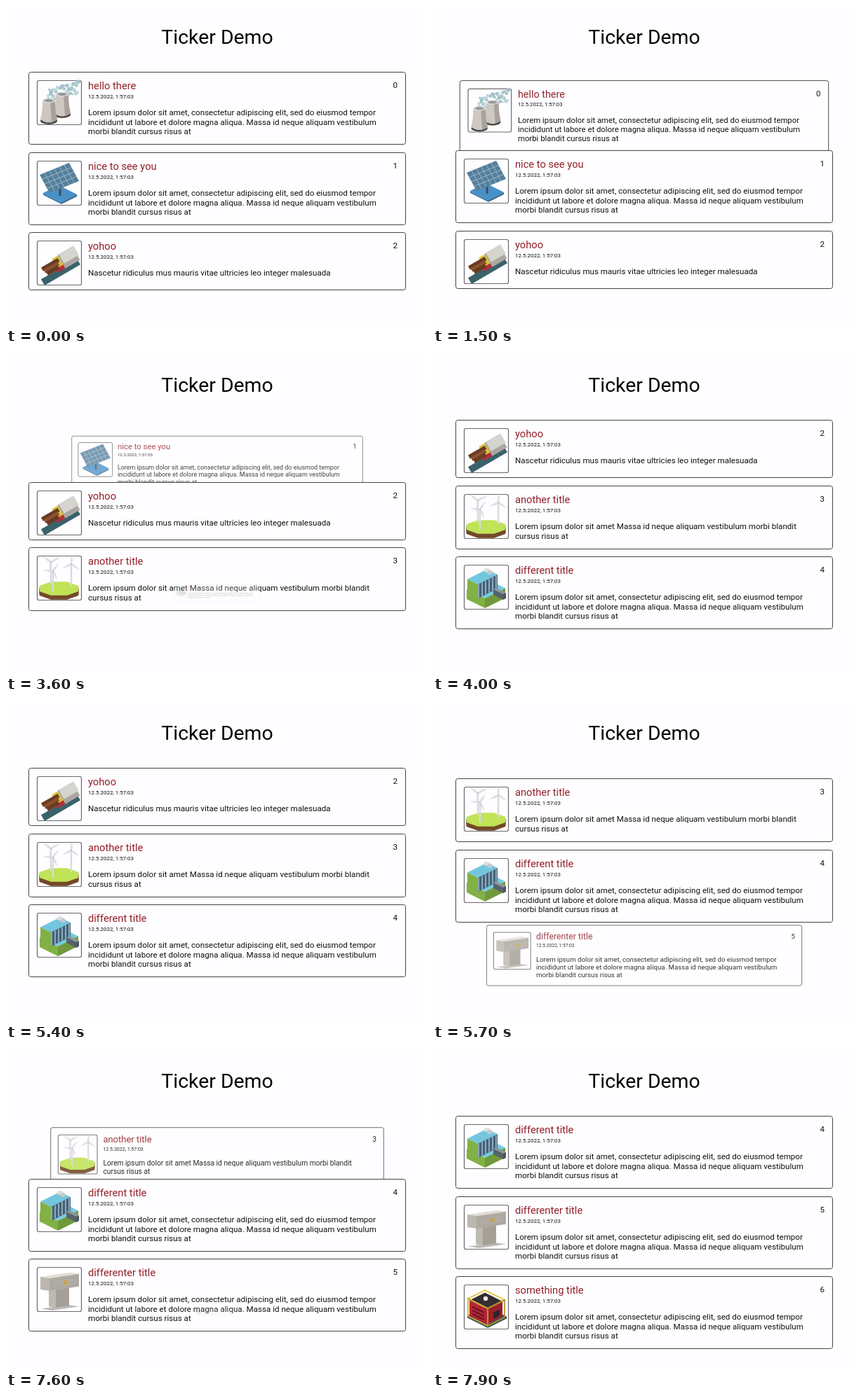
An HTML page for the animation above (8 s loop, 600x457 px).

```html
<!DOCTYPE html>
<html lang="en">
<head>
<meta charset="utf-8">
<title>Ticker Demo</title>
<style>
  html, body { margin: 0; width: 100%; height: 100%; overflow: hidden; background: #fefdff; }
  svg { display: block; }
  text { font-family: Roboto, sans-serif; font-size: 11.6px; fill: #111; }
  .heading { font-size: 28.4px; text-anchor: middle; fill: #000; }
  .title { font-size: 14.7px; fill: #922028; }
  .date { font-size: 7.93px; }
  .index { text-anchor: end; }
  .card { fill: #fefdff; stroke: #444; }
  .thumb { fill: #fefdff; stroke: #6a6a6a; stroke-width: 1.2; }
</style>
</head>
<body>
<svg id="stage" width="600" height="457" viewBox="0 0 600 457">
  <text class="heading" x="301" y="54">Ticker Demo</text>
</svg>
<script>
const LOOP = 8000, DURATION = 300, STARTS = [1490, 3550, 5540, 7567];
const LEFT = 32, TOP = 94.5, WIDTH = 538, GAP = 11.2, LINE = 13.4;

const long = [
  "Lorem ipsum dolor sit amet, consectetur adipiscing elit, sed do eiusmod tempor",
  "incididunt ut labore et dolore magna aliqua. Massa id neque aliquam vestibulum",
  "morbi blandit cursus risus at"];
const medium = [
  "Lorem ipsum dolor sit amet Massa id neque aliquam vestibulum morbi blandit",
  "cursus risus at"];
const short = ["Nascetur ridiculus mus mauris vitae ultricies leo integer malesuada"];

const repeat = (n, draw) => Array.from({ length: n }, (_, i) => draw(i)).join("");
const oval = (fill, x, y, rx, ry = rx) => `<ellipse fill="${fill}" cx="${x}" cy="${y}" rx="${rx}" ry="${ry}"/>`;
const line = (color, width, d) => `<path fill="none" stroke="${color}" stroke-width="${width}" d="${d}"/>`;
const face = (fill, shade, d) => `<path fill="${fill}" style="filter:brightness(${shade})" d="${d}"/>`;

// Isometric box: front bottom corner x,y; a runs right, b runs left, k is the slope.
function box(x, y, a, b, h, top, left = top, right = left, k = .5) {
  return face(top, 1, `M${x} ${y - h}l${a} ${-a * k}l${-b} ${-b * k}l${-a} ${a * k}z`) +
    face(left, .88, `M${x} ${y}v${-h}l${-b} ${-b * k}v${h}z`) +
    face(right, .76, `M${x} ${y}v${-h}l${a} ${-a * k}v${h}z`);
}

const tower = (x, y) =>
  oval("#4c4644", x, y + 29, 12, 5) +
  `<path fill="#cdc7c0" d="M${x - 9} ${y}q0 16-3 27q12 9 24 0q-3-11-3-27z"/>` +
  `<path fill="#a8a19b" d="M${x + 2} ${y}h7q0 16 3 27q-4 3-8 4z"/>` +
  oval("#e8e4df", x, y, 9, 3.2) + oval("#8f9a9b", x, y, 7, 2.2);

const towers = () =>
  repeat(50, i => {
    const u = i / 49;
    return oval(i % 3 ? "#a3c4ca" : "#bdd6d9", 16 + 43 * u,
      22 - 12 * u + 8 * Math.sin(i * 2.4), 2 + Math.sin(i * 1.7));
  }) + tower(36, 20) + tower(17, 29);

const solar = () =>
  box(35, 62, 22, 26, 3, "#4890c8") + line("#444d55", 3, "M33 38V50") +
  `<g transform="matrix(42 -17 14 26 4 20)"><rect width="1" height="1" fill="#547f9c"/>` +
  line("#b3cad5", .018, repeat(5, i => `M${(i + 1) / 6} 0v1`) + repeat(3, i => `M0 ${(i + 1) / 4}h1`)) + "</g>";

function cable() {
  const rod = (color, width, from, to, dy = 0) =>
    line(color, width, `M${6 + 50 * from} ${47 - 29 * from + dy}L${6 + 50 * to} ${47 - 29 * to + dy}`);
  return rod("#3a626b", 10, .05, 1.07, 14) +
    rod("#b72d38", 13, .4, .65, 5) + rod("#d9c53a", 15, .38, .6, -3) +
    repeat(3, i => rod(i % 2 ? "#8a5230" : "#683b22", 6, .03 + i * .07, .5, i * 5 - 5)) +
    rod("#aaa7a2", 22, .58, 1) + rod("#d6d4cf", 15, .58, 1, -4);
}

const turbine = (x, y, foot, turn) =>
  line("#d9d9de", 2.4, `M${x} ${y}V${foot}`) +
  repeat(3, i => `<path fill="#e3e3e7" stroke="#c9c9d0" stroke-width=".4" transform="rotate(${120 * i + turn} ${x} ${y})" d="M${x} ${y}l-1.6-4 1.6-9 1.2 9z"/>`) +
  oval("#c8c8ce", x, y, 1.6);

function wind() {
  const ground = (fill, y) => {
    const corner = i => {
      const a = (i + .5) * Math.PI / 4;
      return `${31.5 + 30 * Math.cos(a)},${y + 10.5 * Math.sin(a)} `;
    };
    return `<polygon fill="${fill}" points="${repeat(8, corner)}"/>`;
  };
  return repeat(6, i => ground("#74492a", 53 - i * .8)) + ground("#c0e357", 47) +
    turbine(20, 9, 41, 65) + turbine(49, 12, 43, 5) + turbine(23, 22, 51, 35);
}

const dam = () =>
  box(30, 62, 29, 26, 14, "#74cbe2", "#93c94d") +
  box(20, 48, 28, 15, 20, "#74c6de", "#93c94d", "#56819f") +
  line("#c6d8e1", 1.2, repeat(6, i => `M${21 + 5 * i} ${28 - 2.5 * i}v19`)) +
  box(56, 50, 4, 14, 8, "#8d999f", "#63717a") +
  oval("#dddfe0", 33, 8, 5, 3) + oval("#c5caca", 37, 11, 4, 3);

const slab = () =>
  box(22, 62, 38, 16, 0, "#bdb9b4", "#bdb9b4", "#bdb9b4", .15) +
  box(27, 58, 19, 10, 28, "#d8d2c8", "#d8d2c8", "#d8d2c8", .15) +
  box(18, 34, 42, 13, 18, "#e3ded5", "#d6d0c6", "#e8e2d8", .15) +
  line("#a59f95", .7, "M21 31v-12l36-5v12z") +
  oval("#c5a648", 41, 22, 3);

const generator = () =>
  box(34, 62, 27, 29, 3, "#3f6069") +
  box(33, 57, 22, 25, 22, "#352e30", "#d0283a") +
  box(42, 49, 9, 0, 9, "#3a3337") +
  line("#4c1a21", 1.4, repeat(3, i => `M12 ${32 + 5 * i}l17 8`)) +
  `<g stroke="#e6c136" stroke-width="1.7" fill-opacity="0">${box(34, 59, 24, 28, 25, "#000")}</g>` +
  oval("#eee8df", 31, 20, 3.2);

const items = [
  ["hello there", long, towers],
  ["nice to see you", long, solar],
  ["yohoo", short, cable],
  ["another title", medium, wind],
  ["different title", long, dam],
  ["differenter title", long, slab],
  ["something title", long, generator],
];

const stage = document.getElementById("stage");
const cards = items.map(([title, lines, icon], i) => {
  const el = document.createElementNS("http://www.w3.org/2000/svg", "g");
  // The thumbnail sets the least distance to the next card.
  const step = Math.max(93.5, 74.5 + LINE * lines.length);
  const height = Math.ceil(step - GAP);
  el.innerHTML =
    `<rect class="card" x=".5" y=".5" width="${WIDTH - 1}" height="${height - 1}" rx="3"/>
    <rect class="thumb" x="12.5" y="12.5" width="63" height="63" rx="2.5"/>
    <g transform="translate(12 12)">${icon()}</g>
    <text class="title" x="85" y="25">${title}</text>
    <text class="date" x="85" y="38">12.5.2022, 1:57:03</text>
    <text class="index" x="526" y="23">${i}</text>` +
    repeat(lines.length, k => `<text x="85" y="${62.3 + LINE * k}">${lines[k]}</text>`);
  stage.append(el);
  return { el, height, step };
});

// cubic-bezier(.25, .1, .25, 1)
function ease(x) {
  if (x >= 1) return 1;
  const bezier = (a, b, u) => 3 * a * u * (1 - u) ** 2 + 3 * b * u * u * (1 - u) + u ** 3;
  let lo = 0, hi = 1;
  for (let i = 0; i < 20; i++) {
    const mid = (lo + hi) / 2;
    if (bezier(.25, .25, mid) < x) lo = mid; else hi = mid;
  }
  return bezier(.1, 1, lo);
}

function place({ el, height }, y, scale = 1) {
  const x = LEFT + WIDTH / 2 * (1 - scale);
  el.style.display = scale > 0 ? "" : "none";
  el.setAttribute("opacity", scale);
  el.setAttribute("transform", `translate(${x} ${Math.floor(y) + height / 2 * (1 - scale)}) scale(${scale})`);
}

function draw(now) {
  const t = now % LOOP;
  const first = STARTS.filter(s => s <= t).length;
  const p = first ? ease((t - STARTS[first - 1]) / DURATION) : 1;
  const shift = p < 1 ? cards[first - 1].step * (1 - p) : 0;
  cards.forEach(card => place(card, 0, 0));
  if (p < 1) place(cards[first - 1], TOP + GAP, 1 - p);
  let y = TOP;
  for (let i = first; i < first + 3; i++) {
    const entering = i === first + 2;
    place(cards[i], entering ? y : y + shift, entering ? p : 1);
    y += cards[i].step;
  }
  requestAnimationFrame(draw);
}
requestAnimationFrame(draw);
</script>
</body>
</html>
```
